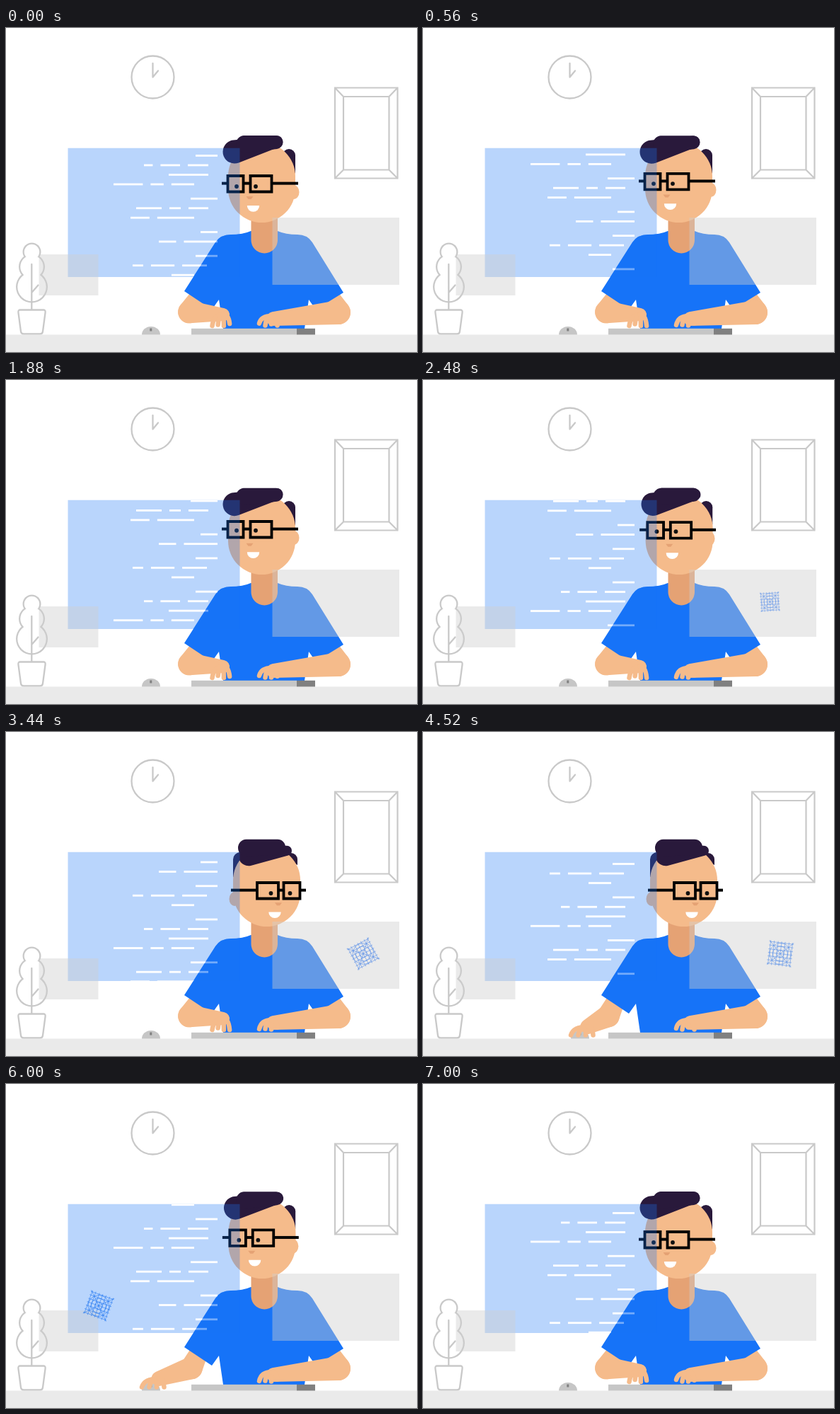
Animation of 581 by 458 pixels, one loop 7040 ms. Source, as an HTML page with a canvas:

```html
<!DOCTYPE html>
<html lang="en">
<head>
<meta charset="utf-8">
<title>Coding at the desk</title>
<style>
  html, body { margin: 0; width: 100%; height: 100%; overflow: hidden; background: #fff; }
  canvas { display: block; }
</style>
</head>
<body>
<canvas id="stage" width="581" height="458"></canvas>
<script>
const c = document.getElementById('stage').getContext('2d');
const LOOP = 7040, PERIOD = 189;
const SKIN = '#f5bb8b', SHADE = '#e5a274', HAIR = '#29193b', SHIRT = '#1673f8';
const LINE = '#c9c9c9', PALE = '#eaeaea', GREY = '#c6c6c6', DARK = '#808080', VEIL = 'rgba(205,205,205,.42)';

const mix = (a, b, k) => a + (b - a) * k;
const linear = k => k;
const smooth = k => k * k * (3 - 2 * k);

// Value at time t of a track written as [time, value] pairs
function track(t, keys, ease = smooth) {
  const i = keys.findIndex(([time]) => t < time);
  if (i < 1) return keys[i ? keys.length - 1 : 0][1];
  const [t0, a] = keys[i - 1], [t1, b] = keys[i];
  return mix(a, b, ease((t - t0) / (t1 - t0)));
}
// Goes from 0 to 1 between a and b, and back between d and e
const pulse = (t, a, b, d, e) => track(t, [[a, 0], [b, 1], [d, 1], [e, 0]]);

function box(x, y, w, h, color) {
  c.fillStyle = color;
  c.fillRect(x, y, w, h);
}
function pill(x, y, w, h, r, color) {
  c.fillStyle = color;
  c.beginPath();
  c.roundRect(x, y, w, h, r);
  c.fill();
}
function oval(x, y, rx, ry, color, from = 0, to = 2 * Math.PI) {
  c.fillStyle = color;
  c.beginPath();
  c.ellipse(x, y, rx, ry, 0, from, to);
  c.fill();
}
const disc = (x, y, r, color) => oval(x, y, r, r, color);
function shape(d, color) {
  c.fillStyle = color;
  c.fill(new Path2D(d));
}
function stroke(d, color, width, join = 'round') {
  c.strokeStyle = color;
  c.lineWidth = width;
  c.lineJoin = join;
  c.stroke(new Path2D(d));
}
// The hull of two circles
function limb(x0, y0, r0, x1, y1, r1, color = SKIN) {
  const a = Math.atan2(y1 - y0, x1 - x0);
  const b = Math.acos((r0 - r1) / Math.hypot(x1 - x0, y1 - y0));
  c.fillStyle = color;
  c.beginPath();
  c.arc(x0, y0, r0, a + b, a - b + 2 * Math.PI);
  c.arc(x1, y1, r1, a - b, a + b);
  c.fill();
}

const shirt = 'M346 287Q335 292 318 292Q303 292 296 303L252 372L291 398L301 384L307 425H422' +
  'L428 384L438 398L477 374L433 303Q426 292 412 292Q395 292 384 287Z';

// Paragraphs of code: each row is its left end, its right end and the shares of its dashes
const ONE = [1], TWO = [0.34, 0.66], RISING = [0.18, 0.4, 0.42], LONG = [0.45, 0.2, 0.35];
const paragraphs = [
  [[268, 299, ONE], [195, 286, RISING], [230, 286, ONE], [152, 266, LONG]],
  [[261, 299, ONE], [184, 286, LONG], [176, 266, TWO]],
  [[275, 299, ONE], [216, 299, TWO]],
  [[268, 299, ONE], [179, 284, RISING], [234, 266, ONE]]
];
const GAP = 11;

function room() {
  box(0, 0, 581, 458, '#fff');
  c.lineCap = 'round';
  stroke('M177.5 69.5a30 30 0 1 0 60 0a30 30 0 1 0-60 0M207.5 50V69.5L215 60.5', LINE, 2.3);
  stroke('M465 84.5H553.5V212.5H465ZM477 97H541.5V200.5H477ZM465 84.5L477 97M553.5 84.5L541.5 97' +
    'M465 212.5L477 200.5M553.5 212.5L541.5 200.5', LINE, 2.2, 'miter');
  for (const [inset, color] of [[0, LINE], [2.3, '#fff']])
    for (const [y, r] of [[316.5, 13], [337.5, 18.5], [366, 22.5]]) disc(36.5, y, r - inset, color);
  stroke('M36.3 334V398M36.3 374L45.5 363.5M20 398.5H53Q56 398.5 55.6 402L52 429Q51.5 432.5 48 432.5H25' +
    'Q21.5 432.5 21 429L17.4 402Q17 398.5 20 398.5Z', LINE, 2.3);
  box(0, 433.5, 581, 25, PALE);
}

function face(turn, nod) {
  const m = (a, b) => mix(a, b, turn);
  const top = 208 + nod, lift = -nod * 0.08;

  // Hair behind the face
  const bx = m(400, 403), lx = m(327, 331);
  disc(bx, 180, 9, HAIR);
  shape(`M${bx - 9} 178L${bx + 9} 180V${m(206, 188)}Z`, HAIR);
  disc(lx, 180, 10, HAIR);
  box(lx - 10, 180, 10, m(8, 25), HAIR);

  oval(mix(407, 323, smooth(turn)), top + 24, 7.5, 10, SKIN);
  pill(m(314, 321), 162, 95, 113, 47.5, SKIN);

  // Fringe
  limb(m(323, 343), 175 + lift, m(16.5, 14.5), m(383, 397), m(160.5, 168) + lift, m(8.3, 7), HAIR);
  limb(m(337, 340), 164 + lift, 12, m(382, 384), m(161.5, 163) + lift, m(9.5, 11), HAIR);

  // Features
  const eye = top + 16 + Math.min(0, nod) * 0.25;
  for (const x of [326, 353]) disc(x + 48.5 * turn, eye, 2.9, '#111');
  shape(`M${m(339.5, 380)} ${238 + nod * 0.8}h10l-3 4h-4z`, SHADE);
  oval(m(349.5, 380), 251 + nod * 0.85, 8.7, 8.7, '#fff', 0, Math.PI);

  // Glasses
  const left = m(313.5, 355), lw = m(22, 30), right = m(345.5, 392.5), rw = m(30, 23);
  stroke(`M${left} ${top + 1}h${lw}v22.5h${-lw}zM${right} ${top + 1}h${rw}v22.5h${-rw}z`, '#000', 3.8, 'miter');
  const bar = (from, to) => box(from, top + 9.6, to - from, 4, '#000');
  bar(m(305, 318), left);
  bar(left + lw, right);
  bar(right + rw, m(413, 424));
}

// Four fingers side by side, tapping in turn
function fingers(hx, hy, x, step, y, t, tap) {
  c.lineCap = 'round';
  for (let i = 0; i < 4; i++, x += step) {
    const lift = tap * Math.max(0, Math.sin(t / LOOP * 44 * Math.PI + i * 2.6));
    stroke(`M${hx} ${hy}Q${mix(hx, x, 0.85)} ${hy} ${x} ${y - lift}`, SKIN, 6.5);
  }
}

function person(t) {
  const reach = pulse(t, 3700, 4250, 6250, 6750);
  const drag = 17 * pulse(t, 4250, 4500, 4850, 5250);
  const ex = mix(259, 262, reach), ey = 401.5;
  limb(272, 381, 13, ex, ey, 15.8);
  limb(458, 380, 13, 470, 402, 17);
  shape(shirt, SHIRT);
  pill(346.5, 245, 37.5, 73.5, 18.7, SHADE);

  const turn = pulse(t, 2380, 2920, 5430, 6110);
  face(turn, mix(-9 * pulse(t, 0, 1400, 4800, 6800), 4, turn));

  // Desk things lie under the hands
  box(262, 424.8, 149, 8.7, GREY);
  box(411, 424.8, 26, 8.7, DARK);
  oval(205 + drag, 433.5, 13, 11.5, GREY, Math.PI, 2 * Math.PI);
  box(203.3 + drag, 424.5, 3, 4, DARK);

  const hx = mix(307, 216 + drag, reach), hy = mix(405, 416.5, reach);
  limb(ex, ey, 15.8, hx, hy, mix(9, 10.5, reach));
  fingers(hx, hy, mix(291.5, 192 + drag, reach), mix(8.2, 10.5, reach), mix(421, 428.5, reach), t, 3 * (1 - reach));
  limb(470, 402, 17, 378, 411, 10);
  fingers(376, 407, 358, 8.5, 420.5, t + 90, 3);
}

function code(t) {
  const scroll = track(t, [[0, 0], [1000, 51], [3440, 104.5], [6000, 178.5], [7000, 187], [LOOP, PERIOD]], linear);
  c.save();
  c.beginPath();
  c.rect(87.5, 169.7, 243, 182.3);
  c.clip();
  box(87, 169, 244, 184, 'rgba(24,115,245,.3)');
  let y = 180.5;
  for (const rows of paragraphs) {
    for (const [left, right, shares] of rows) {
      const at = (y - scroll - 165 + 2 * PERIOD) % PERIOD + 165;
      const ink = right - left - GAP * (shares.length - 1);
      let x = left;
      for (const share of shares) {
        box(x, at - 1.4, ink * share, 2.8, '#fff');
        x += ink * share + GAP;
      }
      y += 13.5;
    }
    y += 6.75;
  }
  // The dashes fade where they pass over the shirt
  c.globalAlpha = 0.6;
  shape(shirt, SHIRT);
  c.restore();
}

function gridIcon(x, scale, degrees, color) {
  if (scale < 0.02) return;
  c.save();
  c.translate(x, 313.5);
  c.rotate(degrees * Math.PI / 180);
  c.scale(scale, scale);
  let d = 'M-17-17L17 17M17-17L-17 17';
  for (const p of [-15.5, -10.5, -5, 0, 5, 10.5, 15.5]) d += `M-17 ${p}H17M${p}-17V17`;
  for (const r of [5, 10.5, 15]) d += `M${r} 0A${r} ${r} 0 1 0 ${-r} 0A${r} ${r} 0 1 0 ${r} 0`;
  stroke(d, color, 0.5);
  c.restore();
}

function draw(now) {
  const t = now % LOOP;
  room();
  person(t);
  code(t);
  box(46.5, 320, 84, 58, VEIL);
  box(376.5, 268, 179.5, 95, VEIL);
  gridIcon(track(t, [[2180, 484], [3000, 505]]), pulse(t, 2200, 2600, 5050, 5400),
    track(t, [[2200, -23], [3440, 62], [4520, 97], [5400, 160]], linear), '#4a86e8');
  gridIcon(131, pulse(t, 5680, 5980, 6580, 6900), (t - 5680) / 16, '#1a73f0');
  requestAnimationFrame(draw);
}
requestAnimationFrame(draw);
</script>
</body>
</html>
```
